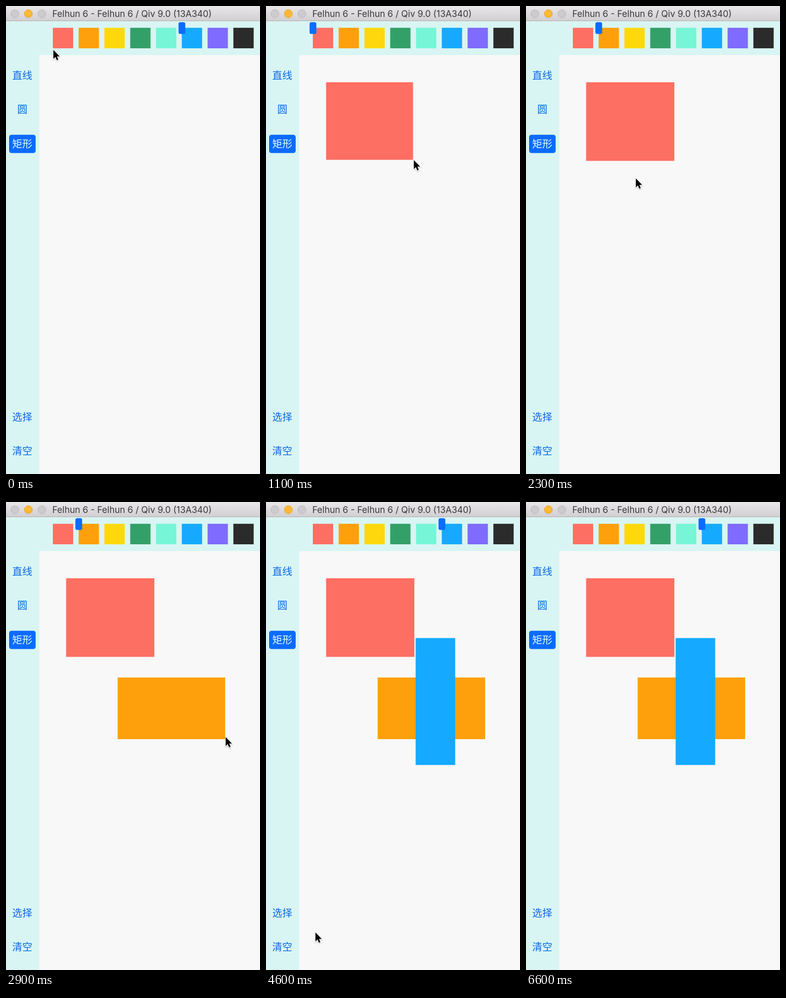
Animation of 488 by 896 pixels, one loop 6.7 s. Source, as an HTML page:

```html
<!DOCTYPE html>
<html lang="zh-CN">
<head>
<meta charset="utf-8">
<title>Drawing board</title>
<style>
  html, body { margin: 0; width: 100%; height: 100%; overflow: hidden; background: #d9f5f3; }
  svg { display: block; width: 488px; height: 896px; }
  .title { font: 17px Inter, Roboto, sans-serif; fill: #3a383a; }
  .tool { font: 19.3px "Noto Sans CJK SC", "Noto Sans CJK", "Noto Sans SC", sans-serif; fill: #0869e6; text-anchor: middle; }
  .tool.active { fill: #e9fbff; }
</style>
</head>
<body>
<svg viewBox="0 0 488 896">
  <defs>
    <linearGradient id="bar" x2="0" y2="1">
      <stop offset="0" stop-color="#e9e7e9"/>
      <stop offset="1" stop-color="#d1cfd1"/>
    </linearGradient>
    <filter id="shadow" x="-50%" y="-50%" width="200%" height="200%">
      <feDropShadow dx="0" dy="1.2" stdDeviation="1" flood-opacity=".3"/>
    </filter>
  </defs>
  <rect width="488" height="896" fill="#d9f5f3"/>
  <rect width="488" height="28" fill="url(#bar)"/>
  <rect y="28" width="488" height="1" fill="#b4b1b4"/>
  <g stroke-width="1">
    <circle cx="17" cy="14.7" r="7.6" fill="#cecbce" stroke="#b8b5b8"/>
    <circle cx="43" cy="14.7" r="7.6" fill="#fdb836" stroke="#e2a033"/>
    <circle cx="69" cy="14.7" r="7.6" fill="#cecbce" stroke="#b8b5b8"/>
  </g>
  <text class="title" x="89" y="21">Felhun 6 - Felhun 6 / Qiv 9.0 (13A340)</text>
  <rect x="64" y="94" width="424" height="802" fill="#f8f8f8"/>
  <rect x="6" y="246.5" width="51" height="35" rx="4.5" fill="#0a6cff"/>
  <g id="tools"></g>
  <g id="swatches"></g>
  <rect id="marker" y="31" width="13" height="22.5" rx="3.5" fill="#0a6cff"/>
  <g id="shapes"></g>
  <path id="cursor" d="M0 0V17.2L4 13.5L6.6 19.7L9.5 18.5L6.9 12.4H12.2Z"
        stroke="#fff" stroke-width="1.8" paint-order="stroke" filter="url(#shadow)"/>
</svg>
<script>
const LOOP = 6700, STEP = 100;
const colors = ["#fd6f62", "#fea00b", "#fed80c", "#33a069", "#76f6d6", "#15aaff", "#7f6bff", "#2b2b2b"];
const tools = [["直线", 133], ["圆", 198], ["矩形", 263.5], ["选择", 787], ["清空", 852]];
const swatchX = i => 90 + 49.55 * i;
const byId = id => document.getElementById(id);

function add(parent, tag, attrs, text = "") {
  const node = document.createElementNS("http://www.w3.org/2000/svg", tag);
  setAttrs(node, attrs);
  node.textContent = text;
  return byId(parent).appendChild(node);
}

function setAttrs(node, attrs) {
  for (const key in attrs) node.setAttribute(key, attrs[key]);
}

// Position along a list of [time, x, y] waypoints.
function along(path, t) {
  const next = path.findIndex(p => p[0] > t);
  if (next < 0) return path[path.length - 1].slice(1);
  if (next === 0) return path[0].slice(1);
  const [a, b] = [path[next - 1], path[next]];
  const k = (t - a[0]) / (b[0] - a[0]);
  return [1, 2].map(i => a[i] + (b[i] - a[i]) * k);
}

const pointer = [
  [0, 91, 84], [200, 104, 62], [400, 106, 66], [600, 115, 146], [800, 190, 225],
  [1100, 284, 295], [1200, 286, 297], [1500, 284, 290], [1900, 155, 62], [2050, 156, 66],
  [2300, 211, 330], [2400, 215, 336], [2800, 422, 455], [2900, 422, 450], [3100, 356, 62],
  [3200, 354, 66], [3400, 288, 261], [3600, 341, 404], [3900, 364, 504], [4100, 360, 515],
  [4600, 95, 824], [4800, 60, 900]
];

const shapes = [
  { color: 0, drag: [[600, 115.5, 146], [800, 188, 223], [1100, 282.5, 294.5], [1200, 285, 296.5]] },
  { color: 1, drag: [[2400, 214.5, 336], [2800, 421, 454]] },
  { color: 5, drag: [[3400, 287.5, 260.5], [3600, 338, 395.5], [3900, 363.5, 503.5]] }
];

const picks = [[0, 5], [300, 0], [2000, 1], [3200, 5]];

tools.forEach(([label, y], i) =>
  add("tools", "text", { class: i === 2 ? "tool active" : "tool", x: 31.3, y: y + 7.2 }, label));
colors.forEach((fill, i) =>
  add("swatches", "rect", { x: swatchX(i), y: 41.7, width: 39, height: 39.3, fill }));
shapes.forEach(s => s.node = add("shapes", "rect", { fill: colors[s.color] }));

function render(t) {
  const picked = picks.filter(p => p[0] <= t).pop()[1];
  setAttrs(byId("marker"), { x: swatchX(picked) - 6.3 });

  for (const { drag, node } of shapes) {
    const [, x, y] = drag[0];
    const [right, bottom] = along(drag, t);
    setAttrs(node, { x, y, width: right - x, height: bottom - y });
  }

  setAttrs(byId("cursor"), {
    transform: `translate(${along(pointer, t)})`,
    visibility: t < 4800 ? "visible" : "hidden"
  });
}

const start = performance.now();
function tick() {
  const t = (performance.now() - start) % LOOP;
  render(Math.floor(t / STEP) * STEP);
  requestAnimationFrame(tick);
}
tick();
</script>
</body>
</html>
```
